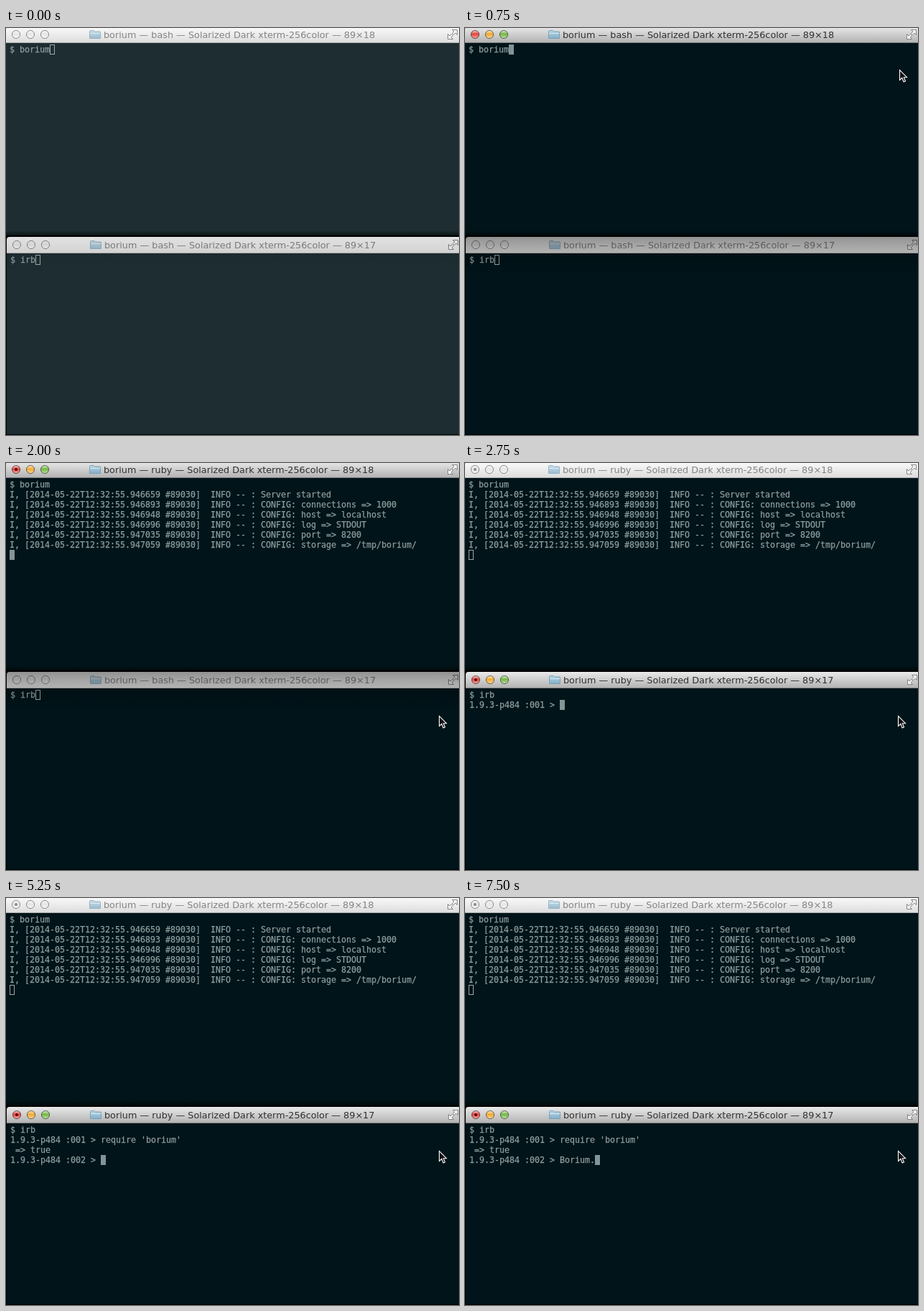
Write an HTML page that moves like this. It is 631x567 px and loops after 8 s.

```html
<!DOCTYPE html>
<html lang="en">
<head>
<meta charset="utf-8">
<title>Two terminals</title>
<style>
  html, body { margin: 0; width: 100%; height: 100%; overflow: hidden; background: #000; }
  svg { display: block; width: 631px; height: 567px; }
  text { white-space: pre; }
  .title { font: 12.8px "DejaVu Sans", sans-serif; fill: #848484; }
  .active .title { fill: #303030; }
  .term { font: 11.63px "DejaVu Sans Mono", monospace; fill: #8d9d9e; stroke: #8d9d9e; stroke-width: .25; }
  .block { fill: #839496; }
  .hollow { fill: none; stroke: #9aa8a8; }
  .icon { opacity: .75; }
  .active .icon { opacity: 1; }
</style>
</head>
<body>
<svg viewBox="0 0 631 567">
  <defs>
    <linearGradient id="bar" x2="0" y2="1"><stop stop-color="#fbfbfb"/><stop offset="1" stop-color="#dcdcdc"/></linearGradient>
    <linearGradient id="barActive" x2="0" y2="1"><stop stop-color="#e9e9e9"/><stop offset="1" stop-color="#b1b1b1"/></linearGradient>
    <linearGradient id="gloss" x2="0" y2="1">
      <stop stop-color="#fff" stop-opacity=".75"/><stop offset=".45" stop-color="#fff" stop-opacity="0"/>
      <stop offset="1" stop-color="#fff" stop-opacity=".55"/>
    </linearGradient>
    <linearGradient id="folder" x2="0" y2="1"><stop stop-color="#b9d7e6"/><stop offset="1" stop-color="#83aec8"/></linearGradient>
    <linearGradient id="shadeDown" x2="0" y2="1">
      <stop stop-opacity=".42"/><stop offset=".4" stop-opacity=".2"/><stop offset="1" stop-opacity="0"/>
    </linearGradient>
    <linearGradient id="shadeUp" x2="0" y2="1"><stop stop-opacity="0"/><stop offset="1" stop-opacity=".7"/></linearGradient>
  </defs>
  <g id="stage"></g>
</svg>
<script>
const LOOP = 8000, CHAR = 7, LINE = 14;
const stage = document.getElementById('stage');

const log = [
  ['55.946659', 'Server started'],
  ['55.946893', 'CONFIG: connections => 1000'],
  ['55.946948', 'CONFIG: host => localhost'],
  ['55.946996', 'CONFIG: log => STDOUT'],
  ['55.947035', 'CONFIG: port => 8200'],
  ['55.947059', 'CONFIG: storage => /tmp/borium/']
].map(([sec, msg]) => `I, [2014-05-22T12:32:${sec} #89030]  INFO -- : ${msg}`);

const server = [[0, '$ borium'], [1250, ['$ borium', ...log, ''].join('\n')]];

const prompt = n => `1.9.3-p484 :00${n} > `;
const first = `$ irb\n${prompt(1)}`;
const second = `${first}require 'borium'\n => true\n${prompt(2)}`;
const client = [
  [0, '$ irb'], [2750, first], [4250, first + "require 'borium'"], [5250, second],
  [6750, second + 'Bo'], [7000, second + 'Bori'], [7250, second + 'Boriu'], [7500, second + 'Borium.']
];

const pointer = [
  [0, null], [250, [612, 40]], [500, [605, 58]], [1500, [610, 157]], [1750, [612, 271]], [2000, [603, 352]]
];
const focus = [[0, ''], [750, 'top'], [2250, 'bottom']];

// value of the latest step already reached
const at = (steps, t) => steps.filter(s => s[0] <= t).pop()[1];

function light(x, color, active, dot) {
  return `<circle cx="${x}" cy="11" r="5.6" fill="${active ? color : '#e6e6e6'}"/>
    <circle cx="${x}" cy="11" r="5.6" fill="url(#gloss)" stroke="${active ? '#000' : '#777'}" stroke-opacity="${active ? .5 : .8}"/>
    ${dot ? `<circle cx="${x}" cy="11" r="2" fill="${active ? '#4d0505' : '#8a8a8a'}"/>` : ''}`;
}

function titleBar(name, rows, active, running) {
  return `<path d="M0 23V4Q0 0 4 0H631V23Z" fill="url(#${active ? 'barActive' : 'bar'})"/>
    <path d="M0 22.5H631" stroke="${active ? '#777' : '#aaa'}"/>
    ${light(14, '#e5433c', active, running)}${light(34, '#f0a92f', active)}${light(54, '#74b843', active)}
    <g class="icon">
      <path d="M116.5 16.5V6.5Q116.5 5.5 117.5 5.5H122L123.5 7H130.5Q131.5 7 131.5 8V16.5Z" fill="url(#folder)" stroke="#7a9fb5"/>
      <path d="M117 9.5H131" stroke="#d8eaf2"/>
    </g>
    <text class="title" x="136" y="16">borium — ${name} — Solarized Dark xterm-256color — 89×${rows}</text>
    <g fill="#f4f4f4" stroke="#858585">
      <path d="M621.5 4.5H628.5V11.5L626 9L623.5 11.5L621.5 9.5L624 7Z"/>
      <path d="M615.5 10.5L618 13L620.5 10.5L622.5 12.5L620 15L622.5 17.5H615.5Z"/>
    </g>`;
}

function terminal(text, active) {
  const lines = text.split('\n');
  const x = 5 + lines.at(-1).length * CHAR, y = 25 + (lines.length - 1) * LINE;
  const rows = lines.map((s, i) => `<text class="term" x="5" y="${36 + i * LINE}">${s}</text>`).join('');
  return rows + (active
    ? `<rect class="block" x="${x}" y="${y}" width="7" height="14"/>`
    : `<rect class="hollow" x="${x + .5}" y="${y + .5}" width="6" height="13"/>`);
}

function win(x, y, height, bg, rows, name, text, active) {
  return `<g transform="translate(${x} ${y})" class="${active ? 'active' : ''}">
    <rect y="23" width="631" height="${height - 23}" fill="${bg}"/>
    ${titleBar(name, rows, active, name === 'ruby')}${terminal(text, active)}</g>`;
}

function scene(t) {
  const bg = t < 250 ? '#1d2d31' : '#001419';
  const front = at(focus, t), tip = at(pointer, t);
  const shade = front === 'top' ? 1 : front ? 0 : .25;
  return win(0, -2, 291, bg, 18, t < 1250 ? 'bash' : 'ruby', at(server, t), front === 'top') +
    `<rect y="282" width="631" height="9" fill="url(#shadeUp)"/>` +
    win(1, 291, 275, bg, 17, t < 2750 ? 'bash' : 'ruby', at(client, t), front === 'bottom') +
    `<rect x="1" y="291" width="630" height="54" fill="url(#shadeDown)" opacity="${shade}"/>` +
    (tip ? `<path transform="translate(${tip[0] + .5} ${tip[1] + .5})" fill="#111" stroke="#fff" stroke-width="1.1"
      d="M0 0V14L3.3 11L5.6 16.5L8 15.5L5.8 10.2H10Z"/>` : '');
}

let shown;
function frame() {
  const next = scene(performance.now() % LOOP);
  if (next !== shown) stage.innerHTML = shown = next;
  requestAnimationFrame(frame);
}
frame();
</script>
</body>
</html>
```
